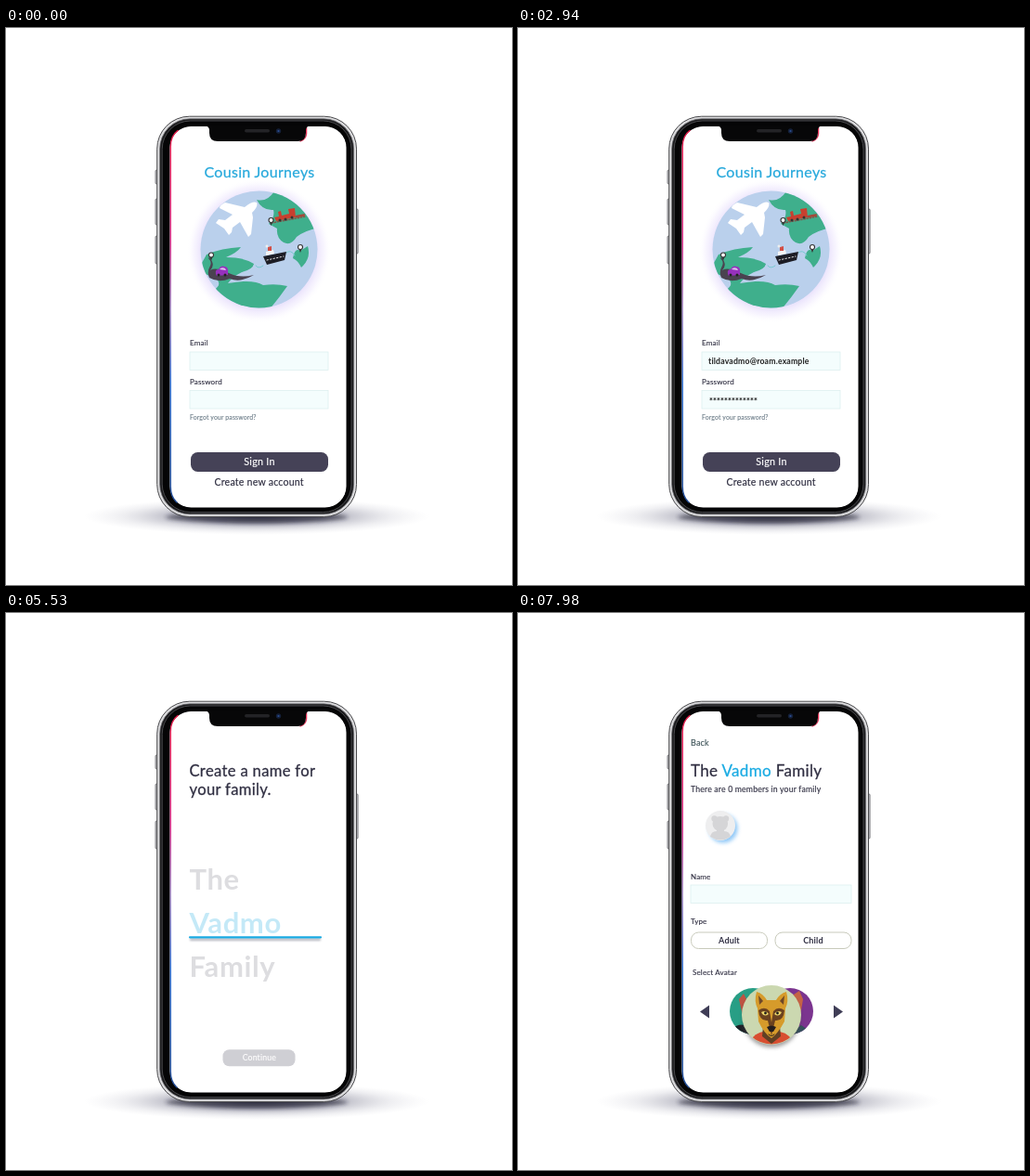
Animation, 545 px wide and 600 px high, one loop 8 s. Source, as an HTML page:

```html
<!DOCTYPE html>
<html lang="en">
<head>
<meta charset="utf-8">
<title>Phone sign-up flow</title>
<style>
  html, body { margin: 0; width: 100%; height: 100%; overflow: hidden; background: #fff; }
  svg { display: block; width: 100vw; height: 100vh; }
  text { font-family: Lato, "Open Sans", sans-serif; letter-spacing: .02em; white-space: pre; }
  .mid { text-anchor: middle; }
  .medium { stroke: currentColor; stroke-width: .016em; }
</style>
</head>
<body>
<svg id="stage" viewBox="0 0 545 600"></svg>
<script>
const INK = '#302f42', BUTTON = '#454257', BLUE = '#1aabe3', PALE = '#dddde0', LAND = '#3faf8c';
const FAMILY = 'Vadmo';
const LOOP = 8000, STEP = 70, SCREEN_X = 178, SCREEN_W = 188, SLIDE = 300;
const FIRST_SLIDE = 4624, SECOND_SLIDE = 6400;

const label = (x, y, size, str, color = INK, cls = 'medium', weight = 400) =>
  `<text x="${x}" y="${y}" font-size="${size}" fill="${color}" color="${color}" class="${cls}" font-weight="${weight}">${str}</text>`;
const box = (x, y, w, h, fill, r = 0, extra = '') =>
  `<rect x="${x}" y="${y}" width="${w}" height="${h}" rx="${r}" fill="${fill}" ${extra}/>`;
const dot = (x, y, r, fill, extra = '') => `<circle cx="${x}" cy="${y}" r="${r}" fill="${fill}" ${extra}/>`;
const shape = (d, fill, extra = '') => `<path d="${d}" fill="${fill}" ${extra}/>`;
const line = (d, color, w, extra = '') => shape(d, 'none', `stroke="${color}" stroke-width="${w}" stroke-linecap="round" ${extra}`);
const field = (x, y, w, h) => box(x, y, w, h, '#f4fdfd', 0, 'stroke="#dcefef" stroke-width=".8"');
const pin = (x, y) => shape(`M${x - 2.4} ${y}L${x} ${y + 6}L${x + 2.4} ${y}Z`, '#333') +
  dot(x, y, 2.5, '#fff', 'stroke="#333" stroke-width="1.1"');
const stops = (...list) => list.map(([at, color, alpha = 1]) =>
  `<stop offset="${at}" stop-color="${color}" stop-opacity="${alpha}"/>`).join('');
const blur = (id, amount) => `<filter id="${id}" filterUnits="userSpaceOnUse" x="0" y="0" width="545" height="600">
  <feGaussianBlur stdDeviation="${amount}"/></filter>`;

const defs = `<defs>
  <clipPath id="screen"><rect x="177" y="106.5" width="189" height="409.5" rx="22"/></clipPath>
  <clipPath id="globe"><circle cx="272.5" cy="238.5" r="63"/></clipPath>
  <clipPath id="portrait"><circle cx="273" cy="433" r="31.5"/></clipPath>
  <clipPath id="leftFace"><circle cx="253" cy="429" r="25"/></clipPath>
  <clipPath id="rightFace"><circle cx="293" cy="429" r="25"/></clipPath>
  <radialGradient id="halo">${stops([.8, '#ebe4fc'], [.9, '#f5f1fe', .7], [1, '#fff', 0])}</radialGradient>
  <radialGradient id="ground">${stops([0, '#24233c', .85], [.35, '#34334d', .6], [.55, '#66667e', .35], [.78, '#9a9aac', .16], [1, '#bbbbc8', 0])}</radialGradient>
  <linearGradient id="edge" x2="0" y2="1">${stops([0, '#f0204e'], [.3, '#e0308f'], [.48, '#7a4fb0', .6], [.68, '#3274d8'], [1, '#254f99'])}</linearGradient>
  ${blur('soft', 2.2)}${blur('slight', 1)}
</defs>`;

const phone = `
  <ellipse cx="270" cy="526" rx="186" ry="20" fill="url(#ground)"/>
  <ellipse cx="270" cy="527" rx="98" ry="5.5" fill="#202032" opacity=".6" filter="url(#soft)"/>
  ${[[161, 153, 15], [161, 184, 28], [161, 224, 30], [376.5, 195, 48]].map(([x, y, h]) =>
    box(x, y, 2.6, h, '#c4c4c7', 1, 'stroke="#58585c" stroke-width=".7"')).join('')}
  ${box(162.7, 95.2, 214.8, 431.3, '#dcdcde', 35, 'stroke="#4a4a4d" stroke-width="1"')}
  ${box(165.6, 97.8, 209, 426, '#1a1a1c', 32.5, 'stroke="#77777b" stroke-width=".8"')}
  ${box(168.2, 100, 203.8, 421.6, '#050506', 30.5, 'stroke="#57575b" stroke-width=".8"')}
  ${box(176.5, 106, 190, 410.5, '#fff', 23)}`;

const notch = `
  ${line('M185 110.5Q177.3 116 177.3 128V494Q177.3 505 184 511', 'url(#edge)', 1.4)}
  ${line('M323.6 107.5V114Q323 120 317 122', '#e93258', 1.3)}
  ${shape('M214 105H328Q323 106 323 110V113Q323 122 314 122H228Q219 122 219 113V110Q219 106 214 105Z', '#070708')}
  ${box(257, 109, 27, 3.4, '#232326', 1.7)}
  ${dot(293.5, 111, 2.7, '#14203a')}${dot(293.5, 111, 1.1, '#2a4d91')}`;

const plane = shape('M270 188Q272 192 265 199L266 204L264 222L261 225L252 209L244 215L243 220L240 223L235 216L226 210L229 206L236 207L244 201L230 194Q230 191 236 188L257 193Q266 186 270 188Z', '#fff');
const train = `
  ${line('M286 210L323 203', '#7b5a4c', 1.6, 'stroke-dasharray="1.2 2"')}
  ${shape('M289 204L294 203L293 198L296 197L297 202L305 200L304 195L311 194L312 204L291 208Z', '#c8402f')}
  ${dot(295, 207, 1.5, '#333')}${dot(301, 206, 1.5, '#333')}${dot(308, 204, 1.5, '#333')}
  ${line('M313 203L321 201.5', '#a5483a', 2.4)}`;
const ship = `
  ${line('M269 256Q272 260 277 256M302 242Q307 238 311 245', '#76c9cf', 1)}
  ${shape('M277 246L302 241L300 250L281 255Z', '#1d1d25')}
  ${line('M281 250L299 246', '#fff', .9, 'stroke-dasharray="1.4 2.2"')}
  ${shape('M280 245L280 241L288 239L289 243Z', '#f5f5f5')}
  ${shape('M282 240V236L286 235V240Z', '#d34e45')}
  ${dot(281, 235, 1.5, '#eee')}`;
const car = `
  ${shape('M219 247Q226 255 220 261Q226 257 240 264Q252 270 267 266Q252 275 241 270Q229 275 219 269Q216 263 220 256Q222 252 218 248Z', '#4a4250')}
  ${shape('M226 265Q225 260 229 260Q231 255 236 257Q240 258 239 264L239 266L227 267Z', '#9631bd')}
  ${shape('M230 260Q232 257 236 259L237 261Z', '#dcc3ee')}
  ${dot(229, 266, 1.5, '#222')}${dot(236, 266, 1.5, '#222')}`;

const globe = `
  ${dot(272.5, 240, 78, 'url(#halo)')}
  ${dot(272.5, 238.5, 63, '#bad0ec')}
  <g clip-path="url(#globe)">
    ${shape('M270 185Q281 188 289 176L340 180V215Q324 217 313 225Q307 235 299 231Q291 226 292 216L283 211Q290 203 288 196Q276 197 270 185Z', LAND)}
    ${shape('M206 262L216 244Q232 237 253 236Q249 242 237 247Q257 247 267 254Q266 260 254 263Q244 268 239 275Q266 270 277 277Q291 275 303 278Q294 291 283 304H242L224 282Q234 276 225 269Z', LAND)}
    ${shape('M309 248Q311 236 317 240L325 235Q329 248 318 258Q315 251 309 248Z', LAND)}
  </g>
  ${plane}${train}${ship}${car}
  ${pin(221, 244.5)}${pin(285.5, 207)}${pin(317, 236)}`;

const backdrop = box(SCREEN_X, 105, SCREEN_W, 413, '#fff');

const signIn = `${backdrop}
  ${label(273, 161, 16, 'Cousin Journeys', '#27a9dc', 'mid medium')}
  ${globe}
  ${label(198, 342, 8, 'Email')}
  ${field(198, 349, 149, 19.5)}
  ${label(198, 384, 8, 'Password')}
  ${field(198, 390.5, 149, 19.5)}
  ${label(198, 421.5, 6.9, 'Forgot your password?', '#6c7c88')}
  <g id="email">${label(205, 361.8, 8.7, 'tildavadmo@roam.example', '#222', '', 700)}</g>
  <g id="password">${label(206, 405, 9, '*'.repeat(13), '#222', 'medium', 700)}</g>
  ${box(199, 457, 148, 21, BUTTON, 7.5)}
  ${label(273, 471.2, 10.8, 'Sign In', '#fff', 'mid medium')}
  ${label(272.7, 492.8, 10.6, 'Create new account', INK, 'mid medium')}`;

const naming = `${backdrop}
  ${label(197.5, 176, 16.6, 'Create a name for')}
  ${label(197.5, 196, 16.6, 'your family.')}
  ${label(197.5, 298, 31, 'The', PALE, '', 700)}
  ${label(197.5, 392, 31, 'Family', PALE, '', 700)}
  ${box(198, 350.5, 141, 2.4, '#667', 1, 'opacity=".5" filter="url(#slight)"')}
  ${line('M198 349.3H339', BLUE, 2.2)}
  <g id="chosen">
    ${label(197.5, 345, 31, FAMILY, BLUE, '', 700)}
    ${box(233.5, 470.3, 78, 18, BUTTON, 7)}
    ${label(272.8, 482.2, 8.7, 'Continue', '#fff', 'mid medium')}
  </g>`;

const fox = `
  ${dot(273, 437, 31, '#444', 'opacity=".5" filter="url(#soft)"')}
  ${dot(273, 433, 32, '#cbd8b0')}
  <g clip-path="url(#portrait)">
    ${shape('M249 468Q250 454 264 451H282Q296 454 297 468Z', '#d84e31')}
    ${shape('M264 445H282L283 456L273 464L263 456Z', '#604024')}
    ${shape('M257 408Q264 410 268 417H278Q282 410 289 408Q292 418 288 426L287 440Q280 453 273 458Q265 453 259 440L258 426Q254 418 257 408Z', '#d69b2b')}
    ${shape('M259 412L264 418L260 422ZM287 412L282 418L286 422Z', '#6f4828')}
    ${shape('M259 428Q266 423 271 429L273 441L275 429Q280 423 287 428Q286 440 277 439L273 455L269 439Q260 440 259 428Z', '#6b421f')}
    ${shape('M262 430Q267 427 270 432Q265 436 262 430ZM284 430Q279 427 276 432Q281 436 284 430Z', '#eed76b')}
    ${dot(266.5, 431, 1.4, '#1e1b1a')}${dot(279.5, 431, 1.4, '#1e1b1a')}
    ${shape('M268 446Q273 443 278 446L275 451H271Z', '#251e1c')}
    ${line('M270 454Q273 457 276 454', '#251e1c', 1)}
  </g>`;

const ghost = `
  ${dot(221, 232, 15.5, '#73baf5', 'opacity=".8" filter="url(#soft)"')}
  ${dot(218, 229, 16, '#eeeeef')}
  ${dot(211.5, 221.5, 3.2, '#d5d5d7')}${dot(224, 221.5, 3.2, '#d5d5d7')}
  <ellipse cx="217.8" cy="227" rx="8.3" ry="8" fill="#d5d5d7"/>
  ${shape('M207 241Q208 235 214 235V231H222V235Q228 235 229 241Q218 248 207 241Z', '#d5d5d7')}`;

const choice = (x, w, str) =>
  box(x, 344, w, 17.5, '#fff', 8, 'stroke="#c8cabb" stroke-width="1"') +
  label(x + w / 2, 356, 9, str, INK, 'mid', 700);

const members = `${backdrop}
  ${label(186, 143, 9, 'Back', '#41565b')}
  <text x="186" y="176" font-size="17" fill="${INK}" color="${INK}" class="medium">The <tspan fill="${BLUE}" stroke="${BLUE}">${FAMILY}</tspan> Family</text>
  ${label(186, 193, 8.7, 'There are 0 members in your family')}
  ${ghost}
  ${label(186, 286.7, 8, 'Name')}
  ${field(186, 293, 173, 19.5)}
  ${label(186, 334.5, 8, 'Type')}
  ${choice(186.5, 82, 'Adult')}${choice(277, 82, 'Child')}
  ${label(188, 389.7, 8, 'Select Avatar')}
  ${shape('M196 429.5L206 422.5V436.5ZM350 429.5L340 422.5V436.5Z', '#3f3d56')}
  ${dot(253, 429, 25, '#289e85')}
  <g clip-path="url(#leftFace)">${shape('M230 448Q239 440 250 446V460H230Z', '#1f2027')}${shape('M238 416L243 410L248 420L243 438Z', '#bd5342')}</g>
  ${dot(293, 429, 25, '#7b348f')}
  <g clip-path="url(#rightFace)">${shape('M294 413L303 407L307 416L304 434L298 442Z', '#c56345')}${shape('M296 450L305 444L314 450V460H296Z', '#34515d')}</g>
  ${fox}`;

document.getElementById('stage').innerHTML = `${defs}${phone}
  <g clip-path="url(#screen)">
    ${[signIn, naming, members].map((page, i) =>
      `<g id="page${i}">${page}${box(SCREEN_X - 2, 105, SCREEN_W + 60, 413, '#000', 0, `id="dim${i}" opacity="0"`)}</g>`).join('')}
  </g>${notch}`;

const get = id => document.getElementById(id);
const progress = (t, start, length) => Math.min(1, Math.max(0, (t - start) / length));
const easeOut = u => 1 - (1 - u) ** 2;
const fades = [['email', 2150], ['password', 2570], ['chosen', 5480]];

function draw(t) {
  const first = easeOut(progress(t, FIRST_SLIDE, SLIDE));
  const second = easeOut(progress(t, SECOND_SLIDE, SLIDE));
  const place = (i, enter, leave) => {
    const x = (1 - enter) * SCREEN_W - leave * SCREEN_W * .3;
    get('page' + i).setAttribute('transform', `translate(${x} 0)`);
    get('page' + i).setAttribute('visibility', enter > 0 && leave < 1 ? 'visible' : 'hidden');
    get('dim' + i).setAttribute('opacity', leave * .26);
  };
  place(0, 1, first);
  place(1, first, second);
  place(2, second, 0);
  for (const [id, start] of fades) get(id).setAttribute('opacity', progress(t, start, 200));
}

function tick(now) {
  draw(Math.floor((now % LOOP) / STEP) * STEP);
  requestAnimationFrame(tick);
}
draw(0);
requestAnimationFrame(tick);
</script>
</body>
</html>
```
